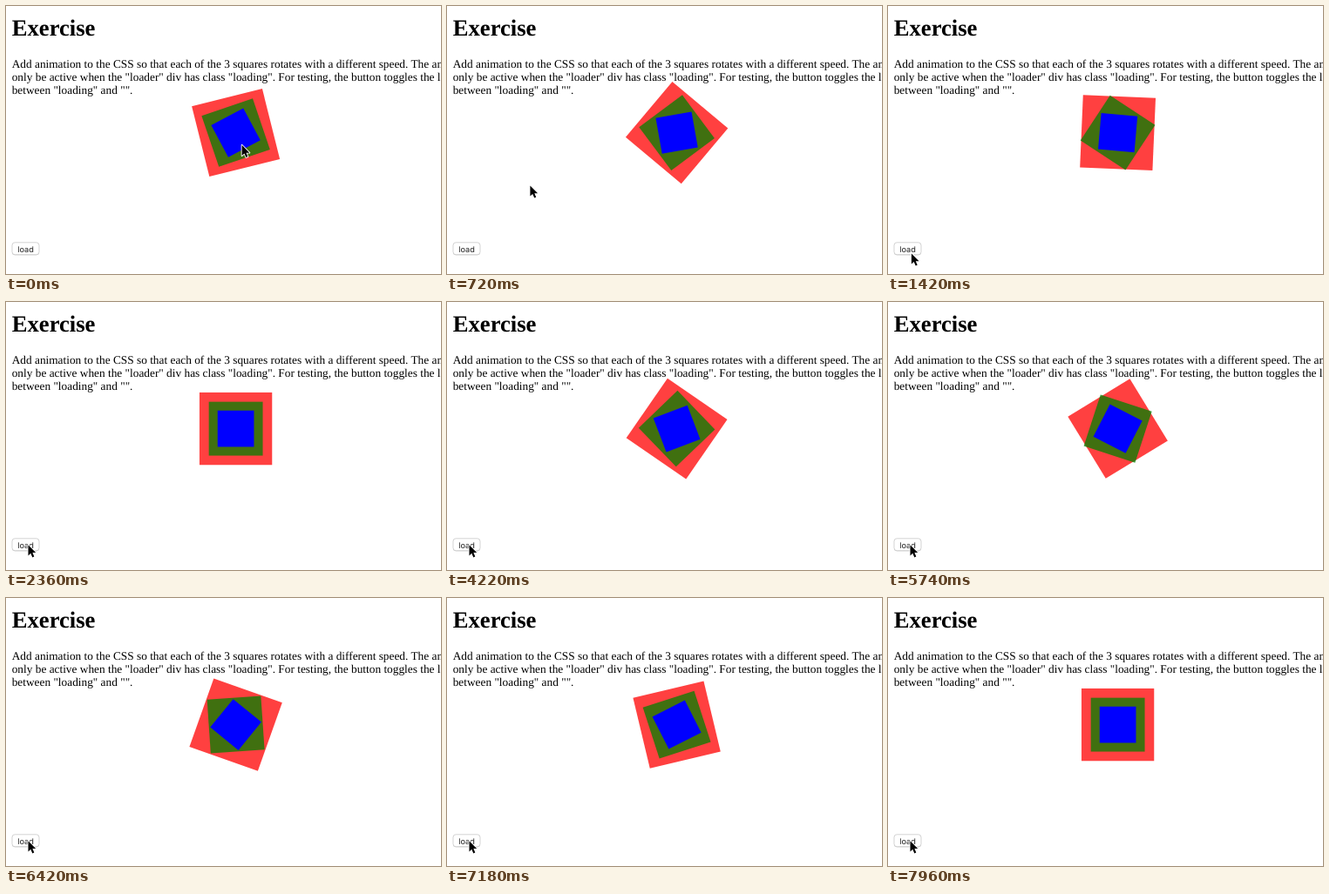
Write an HTML page that moves like this. It is 499x308 px and loops after 8000 ms.

```html
<!DOCTYPE html>
<html lang="en">
<head>
<meta charset="utf-8">
<title>Exercise</title>
<style>
  html, body { margin: 0; width: 100%; height: 100%; overflow: hidden; background: #fff; }
  svg { display: block; width: 499px; height: 308px; overflow: hidden; }
  text { text-rendering: geometricPrecision; }
  .serif { font: 13.333px "Liberation Serif", Times, serif; }
  .title { font: bold 26.667px "Liberation Serif", Times, serif; }
  .label { font: 9.2px Inter, sans-serif; fill: #222; }
</style>
</head>
<body>
<svg viewBox="0 0 499 308">
  <rect width="499" height="308" fill="#fff"/>
  <text class="title" x="6.7" y="34">Exercise</text>
  <g class="serif">
    <text x="6.7" y="70.7">Add animation to the CSS so that each of the 3 squares rotates with a different speed. The animation</text>
    <text x="6.7" y="85.7">only be active when the "loader" div has class "loading". For testing, the button toggles the loader</text>
    <text x="6.7" y="100.7">between "loading" and "".</text>
  </g>
  <g id="loader" transform="translate(263.6 145.6)"></g>
  <rect x="7" y="272.2" width="31" height="14" rx="3.2" fill="#c4c4c4"/>
  <rect x="7" y="271.8" width="31" height="14" rx="3.2" fill="#fff" stroke="#c8c8c8" stroke-width=".8"/>
  <text class="label" x="22.5" y="282.5" text-anchor="middle">load</text>
  <path id="cursor" d="M0 0V12.2L2.8 9.6L4.8 14.2L6.8 13.3L4.9 8.9H8.7Z"
        stroke="#fff" stroke-width="1.8" stroke-linejoin="round" paint-order="stroke"/>
</svg>
<script>
  const LOOP = 8000;
  const STOP = 2000, RESTART = 3760, END = 7940;
  const LEAD = 3412; // spin time already elapsed when the loop begins

  const loader = document.getElementById('loader');
  const cursor = document.getElementById('cursor');

  // side, colour, ms per turn
  const squares = [
    [83.3, 'rgba(255,0,0,.75)', 4800],
    [61.9, 'rgba(0,128,0,.75)', 3600],
    [41.7, '#00f', 2400]
  ].map(([side, fill, period]) => {
    const el = document.createElementNS('http://www.w3.org/2000/svg', 'rect');
    const attrs = { x: -side / 2, y: -side / 2, width: side, height: side, fill };
    for (const key in attrs) el.setAttribute(key, attrs[key]);
    loader.append(el);
    return { el, period };
  });

  const ease = (t, from, to) => {
    const u = Math.min(1, Math.max(0, (t - from) / (to - from)));
    return u * u * (3 - 2 * u);
  };
  const bezier = (a, b, c, s) => a * (1 - s) ** 2 + 2 * b * s * (1 - s) + c * s * s;

  function spinTime(t) {
    if (t < STOP) return LEAD + t;
    if (t >= RESTART && t < END) return t - RESTART;
    return 0;
  }

  function cursorAt(t) {
    const s = ease(t, 0, 1300);
    const nudge = ease(t, 1500, 1740);
    return [bezier(270.6, 80, 26.9, s) - 1.4 * nudge, bezier(159.8, 169, 284.4, s) - 5.2 * nudge];
  }

  function draw(t) {
    const spin = spinTime(t);
    for (const { el, period } of squares) {
      el.setAttribute('transform', `rotate(${spin / period * 360 % 360})`);
    }
    cursor.setAttribute('transform', `translate(${cursorAt(t)})`);
  }

  const start = performance.now();
  function tick() {
    draw((performance.now() - start) % LOOP);
    requestAnimationFrame(tick);
  }
  tick();
</script>
</body>
</html>
```
